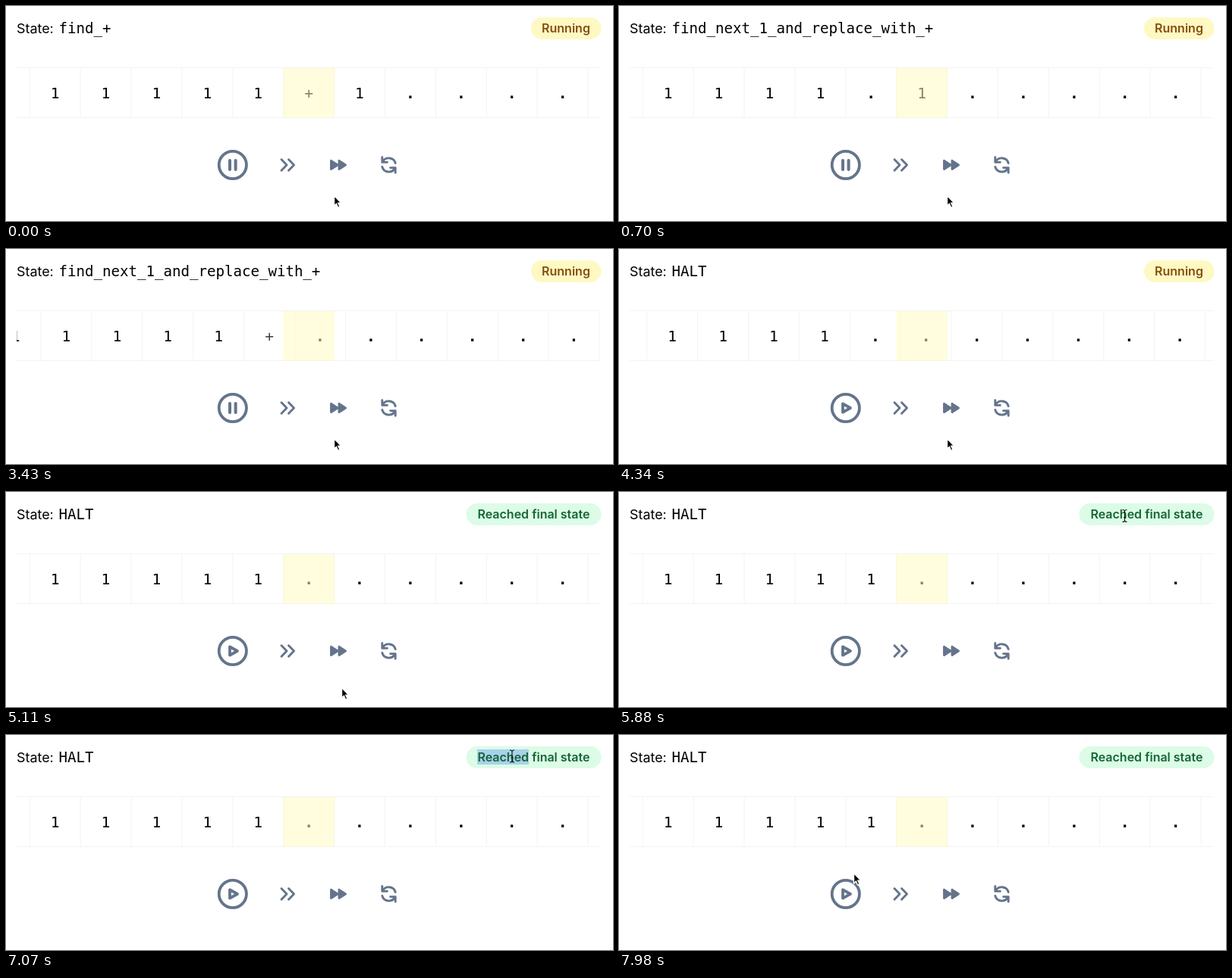
An HTML page that plays this animation: 800x284 px, repeating every 8000 ms.

```html
<!DOCTYPE html>
<html lang="en">
<head>
<meta charset="utf-8">
<title>Tape machine</title>
<style>
html, body { margin: 0; width: 100%; height: 100%; overflow: hidden; background: #fff; }
svg { display: block; width: 800px; height: 284px; }
text { font-family: Inter, sans-serif; }
.mono { font-family: "DejaVu Sans Mono", monospace; font-size: 19.1px; }
#tape text { font-size: 19.6px; text-anchor: middle; }
.badge { font-size: 16px; font-weight: 600; text-anchor: middle; }
.line { fill: none; stroke: #f2f3f4; }
.icons { fill: none; stroke: #64748b; stroke-width: 2.9; stroke-linecap: round; stroke-linejoin: round; }
.ring { fill: none; stroke: #5aa0f4; }
</style>
</head>
<body>
<svg viewBox="0 0 800 284">
  <clipPath id="view"><rect x="14" y="80" width="770" height="70"/></clipPath>

  <text x="14" y="35.5" font-size="17.9">State:</text>
  <text id="state" class="mono" x="69.5" y="35.5"></text>

  <g id="running" class="badge">
    <rect x="692" y="15" width="92.5" height="29" rx="14.5" fill="#fef9c3"/>
    <text x="738" y="35" fill="#854d0e">Running</text>
  </g>
  <g id="done" class="badge">
    <rect x="606.5" y="15" width="178" height="29" rx="14.5" fill="#dcfce7"/>
    <rect id="selection" x="621" y="19" width="68" height="20" fill="#a8d1ec"/>
    <text x="695.5" y="35" fill="#166534">Reached final state</text>
  </g>

  <g clip-path="url(#view)">
    <path class="line" d="M14 81.5H784M14 147.5H784"/>
    <g id="tape"></g>
    <rect x="365.5" y="82" width="67.5" height="65.5" fill="#fffbc0" opacity=".52"/>
  </g>

  <g class="icons">
    <circle cx="298.8" cy="210" r="18.1" stroke-width="3.8"/>
    <path id="pause" d="M295 204V216M302.6 204V216" stroke-width="4"/>
    <path id="play" d="M295 204.4V215.6L304.9 210Z" stroke-width="3.8"/>
    <path d="M363 202.8L370 210L363 217.2M372.5 202.8L379.5 210L372.5 217.2"/>
    <path d="M428.5 204.4V215.6L437 210ZM439 204.4V215.6L447.5 210Z" fill="#64748b"/>
    <path d="M495.8 199.8V206.4H502.4M496.4 206A9 9 0 0 1 513.2 207.6M513.2 220.2V213.6H506.6M512.6 214A9 9 0 0 1 495.8 212.4"/>
  </g>

  <g id="rings"></g>
  <g id="cursor">
    <path id="arrow" d="M.5 .5V14L3.4 11.2L5.6 16.2L8 15.2L5.8 10.2H9.8Z"
      stroke="#fff" stroke-width="1.4"/>
    <path id="beam" d="M-3 -8Q0 -8 0 -6Q0 -8 3 -8M0 -6V6M-3 8Q0 8 0 6Q0 8 3 8M-1.5 2H1.5"
      fill="none" stroke="#111" stroke-width="1.1"/>
  </g>
</svg>

<script>
const LOOP = 8000, CELL = 66.9, CENTER = 399.1;
const START_TAPE = "11111+1........";
const SEEK = "find_next_1_and_replace_with_+";

// Each step sets the state, moves the head and may write one cell.
const steps = [
  { at: 70, state: SEEK, from: 5, to: 6, cell: 5, sym: "." },
  { at: 1120, state: "replace_pivot_with_1", from: 6, to: 5, cell: 6, sym: "+" },
  { at: 2200, state: "find_+", from: 5, to: 6, cell: 5, sym: "1" },
  { at: 3225, state: SEEK, from: 6, to: 7, cell: 6, sym: "." },
  { at: 4270, state: "HALT", from: 7, to: 6 }
];
const presses = [[6160, 6260], [6340, 6530], [7280, 7360]];

const $ = id => document.getElementById(id);
const add = (parent, tag, attrs) => {
  const el = document.createElementNS("http://www.w3.org/2000/svg", tag);
  for (const key in attrs) el.setAttribute(key, attrs[key]);
  return parent.appendChild(el);
};
const show = (id, on) => $(id).setAttribute("opacity", +on);
const ramp = (t, a, b) => Math.min(1, Math.max(0, (t - a) / (b - a)));
const smooth = u => u * u * (3 - 2 * u);
const cubic = (a, b, c, d, u) => {
  const v = 1 - u;
  return a * v * v * v + 3 * b * v * v * u + 3 * c * v * u * u + d * u * u * u;
};

// cubic-bezier(.4, 0, .1, 1)
function glide(x) {
  let lo = 0, hi = 1;
  for (let i = 0; i < 20; i++) {
    const mid = (lo + hi) / 2;
    if (cubic(0, .4, .1, 1, mid) < x) lo = mid; else hi = mid;
  }
  return cubic(0, 0, 1, 1, lo);
}

const symbols = [...START_TAPE].map((_, i) => {
  const x = CENTER + i * CELL;
  add($("tape"), "path", { class: "line", d: `M${x - CELL / 2} 82V147` });
  return add($("tape"), "text", { class: "mono", x, y: 121.6 });
});
const rings = presses.map(() => add($("rings"), "circle", { class: "ring", cx: 667, cy: 27.6 }));

function drawTape(t) {
  const tape = [...START_TAPE], alpha = tape.map(() => 1);
  let state = "find_+", head = 5;
  for (const s of steps) {
    const dt = t - s.at;
    if (dt < 0) break;
    state = s.state;
    head = s.from + (s.to - s.from) * glide(ramp(dt, 0, 450));
    if (!s.sym) continue;
    if (dt >= 350) tape[s.cell] = s.sym;
    alpha[s.cell] = dt < 350 ? 1 - ramp(dt, 150, 350) : ramp(dt, 350, 600);
  }
  $("state").textContent = state;
  $("tape").setAttribute("transform", `translate(${-head * CELL})`);
  symbols.forEach((el, i) => {
    el.textContent = tape[i];
    el.setAttribute("font-weight", tape[i] === "." ? 700 : 400);
    el.setAttribute("opacity", alpha[i]);
  });
}

function pointer(t) {
  if (t < 5100) return [432, 250];
  if (t < 7340) {
    const u = smooth(ramp(t, 5110, 5920));
    return [cubic(442, 490, 640, 667, u), cubic(258, 288, 200, 28, u)];
  }
  const u = smooth(ramp(t, 7340, 7980));
  return [667 - 358 * u, 28 + 154 * u];
}

function drawPointer(t) {
  const [x, y] = pointer(t), overText = y < 44 && x > 607;
  $("cursor").setAttribute("transform", `translate(${x} ${y})`);
  show("arrow", !overText);
  show("beam", overText);
  rings.forEach((ring, i) => {
    const [down, up] = presses[i], fade = ramp(t, up, up + 300);
    ring.setAttribute("r", 20 + 5.3 * ramp(t, down, down + 80) + 13 * fade);
    ring.setAttribute("stroke-width", 4 * (1 - fade));
    ring.setAttribute("opacity", t < down ? 0 : .75 * (1 - fade));
  });
}

function frame() {
  const t = performance.now() % LOOP;
  drawTape(t);
  show("running", t < 4830);
  $("done").setAttribute("opacity", t < 4830 ? 0 : .5 + .5 * ramp(t, 4830, 4970));
  show("selection", t >= 6340 && t < 7290);
  show("pause", t < 4270);
  show("play", t >= 4270);
  drawPointer(t);
  requestAnimationFrame(frame);
}
frame();
</script>
</body>
</html>
```
